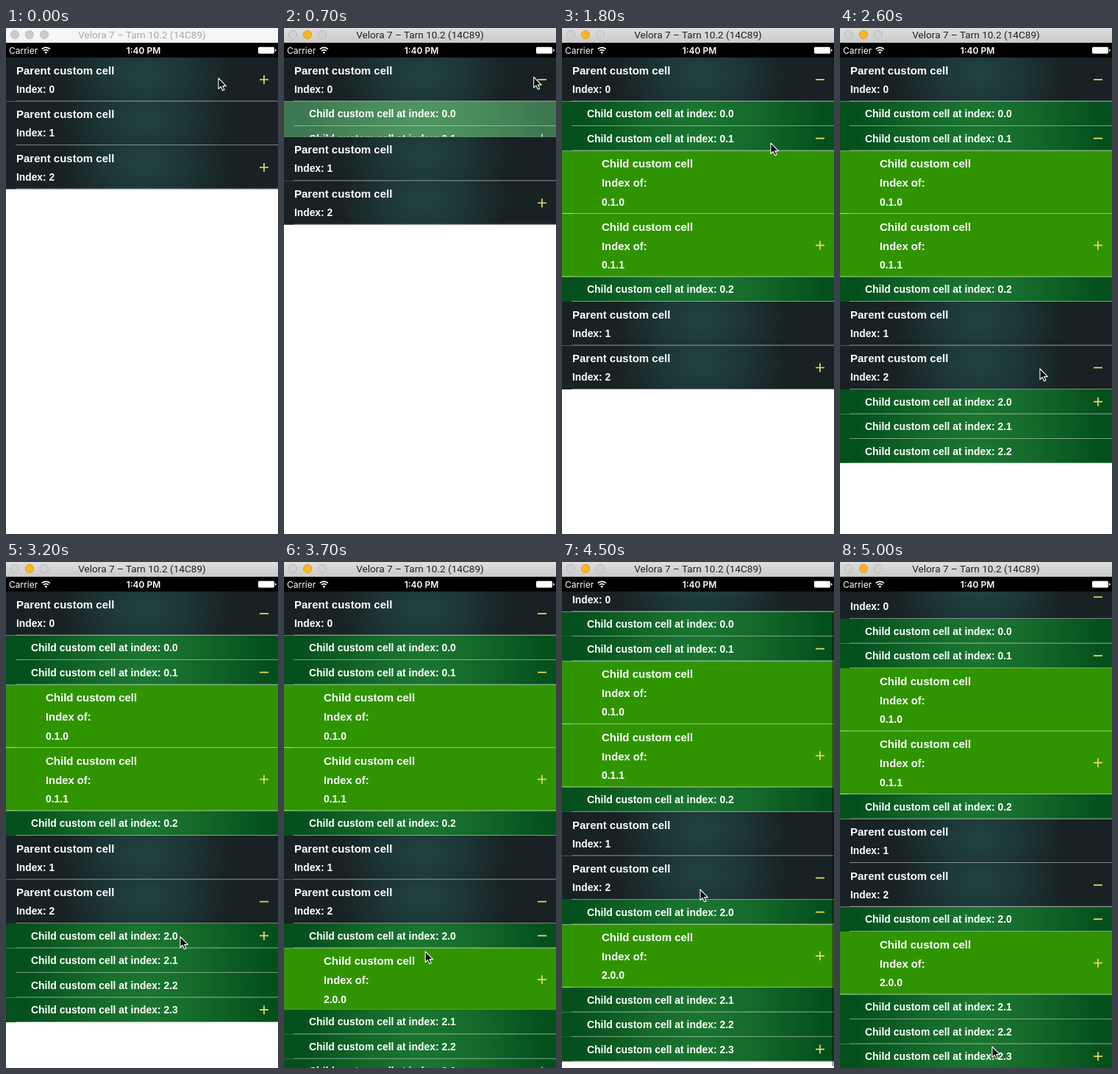
Animation, 370 px wide and 686 px high, one loop 5.1 s. Source, as an HTML page:

```html
<!DOCTYPE html>
<html lang="en">
<head>
<meta charset="utf-8">
<title>Expandable table</title>
<style>
html, body { margin: 0; width: 100%; height: 100%; overflow: hidden; background: #fff; }
body > svg { display: block; }
.cell { font-family: "Liberation Sans", Arial, sans-serif; font-weight: bold; fill: #fff; }
.bar { font-family: Roboto, sans-serif; }
.status { font-family: Inter, sans-serif; fill: #fff; }
</style>
</head>
<body>
<svg id="stage" width="370" height="686" viewBox="0 0 370 686">
  <defs>
    <radialGradient id="parent" gradientUnits="userSpaceOnUse" gradientTransform="translate(190 24) scale(118 82)" cx="0" cy="0" r="1">
      <stop offset="0" stop-color="#20423f"/>
      <stop offset=".45" stop-color="#1d3737"/>
      <stop offset="1" stop-color="#182123"/>
    </radialGradient>
    <radialGradient id="child" gradientUnits="userSpaceOnUse" gradientTransform="translate(190 17) scale(165 95)" cx="0" cy="0" r="1">
      <stop offset="0" stop-color="#1b7831"/>
      <stop offset=".45" stop-color="#14692a"/>
      <stop offset="1" stop-color="#04501d"/>
    </radialGradient>
    <linearGradient id="chrome" x2="0" y2="1">
      <stop offset="0" stop-color="#dedede"/>
      <stop offset="1" stop-color="#cacaca"/>
    </linearGradient>
  </defs>
  <rect width="370" height="686" fill="#fff"/>
  <g id="table"></g>
  <rect id="thumb" x="367.4" width="2.3" rx="1.1" fill="#000" fill-opacity=".4"/>
  <rect id="title" width="370" height="20"/>
  <g id="lights" stroke-width="1">
    <circle cx="12" cy="9" r="5.6"/>
    <circle cx="32" cy="9" r="5.6"/>
    <circle cx="52" cy="9" r="5.6"/>
  </g>
  <text id="caption" class="bar" x="185" y="14" font-size="13.6" text-anchor="middle">Velora 7 – Tarn 10.2 (14C89)</text>
  <rect y="20" width="370" height="20" fill="#000"/>
  <g class="status" font-size="12">
    <text x="4" y="34.5">Carrier</text>
    <text x="187" y="34.5" text-anchor="middle" font-weight="600">1:40 PM</text>
  </g>
  <g fill="none" stroke="#fff" stroke-width="1.7">
    <path d="M48.8 28.6a7.8 7.8 0 0 1 11 0M50.9 31a4.8 4.8 0 0 1 6.8 0"/>
    <path d="M54.3 35l-1.9-2a2.7 2.7 0 0 1 3.8 0z" fill="#fff" stroke="none"/>
  </g>
  <g fill="#fff">
    <rect x="343" y="25.7" width="22" height="9" rx="1.6"/>
    <path d="M366 28.5q1.6 .3 1.6 1.7t-1.6 1.7z"/>
  </g>
  <path id="pointer" d="M0 0V14.5L3.3 11.4 5.6 16.8 8 15.8 5.7 10.6H10.4Z" fill="#000" stroke="#fff" stroke-width="1.1" stroke-linejoin="round"/>
</svg>
<script>
const LOOP = 5100, TOP = 40, BOTTOM = 686, OPEN_MS = 300, REST = 22.5, PULL = 55;
const $ = id => document.getElementById(id);

function add(host, tag, attrs, text) {
  const el = document.createElementNS("http://www.w3.org/2000/svg", tag);
  for (const k in attrs) el.setAttribute(k, attrs[k]);
  if (text) el.textContent = text;
  return host.appendChild(el);
}

// Text lines are [text, font size, baseline].
const KINDS = {
  parent: { h: 59.5, x: 14, fill: "url(#parent)", icon: 30,
    lines: n => [["Parent custom cell", 15, 22.7], ["Index: " + n, 13.8, 47.7]] },
  child: { h: 33.5, x: 34, fill: "url(#child)", icon: 16.7,
    lines: n => [["Child custom cell at index: " + n, 13.95, 21.7]] },
  leaf: { h: 85.5, x: 54, fill: "#309400", icon: 42.7,
    lines: n => [["Child custom cell", 15, 22.8], ["Index of:", 14.8, 48.8], [n, 13.9, 74]] }
};

const node = (kind, name, icon, kids = [], opens = Infinity) => ({ kind, name, icon, kids, opens });
const child = (...a) => node("child", ...a);
const leaf = (...a) => node("leaf", ...a);
const tree = [
  node("parent", "0", true, [
    child("0.0"),
    child("0.1", true, [leaf("0.1.0"), leaf("0.1.1", true)], 1450),
    child("0.2")
  ], 555),
  node("parent", "1"),
  node("parent", "2", true, [
    child("2.0", true, [leaf("2.0.0", true)], 3430),
    child("2.1"), child("2.2"), child("2.3", true)
  ], 2400)
];

function build(host, nodes) {
  for (const n of nodes) {
    const k = KINDS[n.kind];
    n.g = add(host, "g", {});
    add(n.g, "rect", { width: 370, height: k.h, fill: k.fill });
    add(n.g, "rect", { x: 13, y: k.h - 1, width: 357, height: 1, fill: "#fff", "fill-opacity": .45 });
    if (n.kind === "leaf")
      add(n.g, "rect", { y: k.h - 1, width: 13, height: 1, fill: "#fff", "fill-opacity": .65 });
    for (const [text, size, y] of k.lines(n.name))
      add(n.g, "text", { class: "cell", x: k.x, y, "font-size": size }, text);
    if (n.icon) n.mark = add(n.g, "path", { stroke: "#e9dc66", "stroke-width": 1.7 });
    if (n.kids.length) {
      n.box = add(n.g, "svg", { y: k.h, width: 370, overflow: "hidden" });
      build(n.box, n.kids);
    }
  }
}

const clamp = v => Math.max(0, Math.min(1, v));
const span = (t, a, b) => clamp((t - a) / (b - a));
const smooth = u => u * u * (3 - 2 * u);

// Places rows one under another and returns their total height.
function place(nodes, t) {
  let y = 0;
  for (const n of nodes) {
    const k = KINDS[n.kind];
    n.g.setAttribute("transform", `translate(0 ${y})`);
    y += k.h;
    if (n.mark) {
      const bar = `M345 ${k.icon}h12`;
      n.mark.setAttribute("d", t >= n.opens ? bar : bar + `M351 ${k.icon - 6}v12`);
    }
    if (n.box) {
      const open = smooth(span(t, n.opens, n.opens + OPEN_MS));
      const h = place(n.kids, t) * open;
      n.box.setAttribute("height", h);
      n.box.setAttribute("opacity", clamp(open * 1.6));
      n.box.setAttribute("visibility", open ? "visible" : "hidden");
      y += h;
    }
  }
  return y;
}

function scrollAt(t) {
  if (t < 4250) return PULL * smooth(span(t, 3750, 4100));
  return REST + (PULL - REST) * (1 - span(t, 4250, 4800)) ** 2;
}

// Pointer stops: time, x, y.
const STOPS = [
  [0, 289, 68], [300, 289, 68], [500, 340, 66], [680, 340, 66], [1200, 282, 169],
  [1400, 284, 156], [1850, 284, 156], [2300, 272, 462], [2600, 272, 462],
  [3200, 237, 508], [3500, 230, 510], [3750, 188, 530], [4100, 185, 446],
  [4500, 188, 444], [5000, 207, 657], [LOOP, 207, 657]
];
function pointerAt(t) {
  const i = Math.max(1, STOPS.findIndex(s => s[0] > t));
  const [a, x, y] = STOPS[i - 1], [b, x2, y2] = STOPS[i];
  const u = smooth(span(t, a, b));
  return [x + (x2 - x) * u, y + (y2 - y) * u];
}

function paintTitle(active) {
  $("title").setAttribute("fill", active ? "url(#chrome)" : "#f6f6f6");
  $("caption").setAttribute("fill", active ? "#222" : "#a9a9a9");
  [...$("lights").children].forEach((c, i) => {
    const lit = active && i === 1;
    c.setAttribute("fill", lit ? "#fdb424" : active ? "#d2d2d2" : "#cdcdcd");
    c.setAttribute("stroke", lit ? "#e09e1a" : active ? "#bababa" : "#bdbdbd");
  });
}

function draw(t) {
  const size = place(tree, t), off = scrollAt(t);
  $("table").setAttribute("transform", `translate(0 ${TOP - off})`);

  const view = BOTTOM - TOP, over = Math.max(0, off - REST);
  const len = Math.max(40, view * Math.min(1, view / size) - over);
  $("thumb").setAttribute("height", len);
  $("thumb").setAttribute("y", BOTTOM - 2 - len - Math.max(0, REST - off));
  $("thumb").setAttribute("opacity", span(t, 3750, 3850) * (1 - span(t, 4750, 4950)));

  paintTitle(t >= 300);
  $("pointer").setAttribute("transform", `translate(${pointerAt(t)})`);
}

build($("table"), tree);
const start = performance.now();
function tick() {
  draw((performance.now() - start) % LOOP);
  requestAnimationFrame(tick);
}
tick();
</script>
</body>
</html>
```
